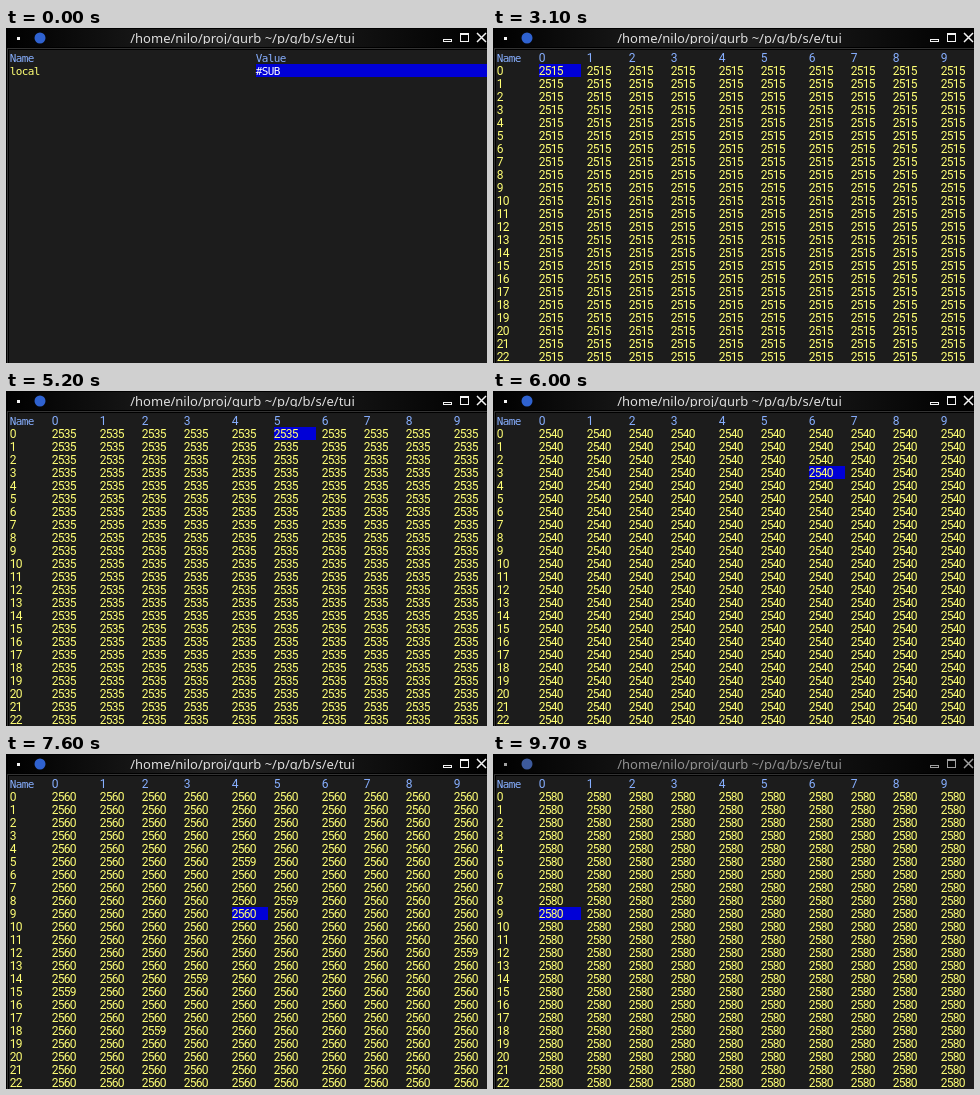
Write an HTML page with a canvas that moves like this. It is 481x335 px and loops after 10000 ms.

```html
<!DOCTYPE html>
<html lang="en">
<head>
<meta charset="utf-8">
<title>Terminal table</title>
<style>
html, body { margin: 0; width: 100%; height: 100%; overflow: hidden; background: #000; }
canvas { display: block; }
</style>
</head>
<body>
<canvas id="stage" width="481" height="335"></canvas>
<script>
const LOOP = 10000, W = 481, H = 335;
const ROWS = 23, COLS = 10;
const OPEN = 3100;                  // the grid appears
const COUNT = 3080, PERIOD = 502;   // cells gain 5 per period
const KEYS = 4400, REPEAT = 190;    // cursor key repeat
const RIGHT = 6, DOWN = 9, LEFT = 6;
const YELLOW = '#ffff75', PALE = '#ffffc8', WHITE = '#fff';
const HEAD = '#87afff', SELECT = '#0000d7', PANEL = '#1c1c1c';
const ctx = document.getElementById('stage').getContext('2d');

const clamp = (v, lo, hi) => Math.min(hi, Math.max(lo, v));
const colX = col => 46 + 6 * Math.floor((37 * col + 3) / 5);
const rowY = row => 36 + 13 * row; // row -1 is the header

function random(seed) {
  const v = Math.sin(seed * 12.9898) * 43758.5453;
  return v - Math.floor(v);
}

function box(x, y, w, h, color) {
  ctx.fillStyle = color;
  ctx.fillRect(x, y, w, h);
}

// Terminal text on a 6 px character grid
function type(text, x, row, color) {
  ctx.fillStyle = color;
  ctx.textAlign = 'center';
  [...String(text)].forEach((ch, i) => {
    ctx.font = /\d/.test(ch) ? '12px Roboto, sans-serif' : '11px "DejaVu Sans Mono", monospace';
    ctx.fillText(ch, x + 6 * i + 3, rowY(row) + 11);
  });
}

function titleBar(active) {
  const ink = active ? '#f4f4f4' : '#a0a0a0';
  const shine = ctx.createLinearGradient(0, 0, W, 0);
  shine.addColorStop(0, '#000');
  shine.addColorStop(0.45, active ? '#242424' : '#1e1e1e');
  shine.addColorStop(1, '#000');
  box(2, 1, W - 2, 18, shine);
  box(2, 20, W - 2, 1, '#333');

  box(11, 9, 3, 3, ink);
  ctx.fillStyle = active ? '#2f62d0' : '#3d5a9c';
  ctx.beginPath();
  ctx.arc(34, 10, 5.5, 0, 2 * Math.PI);
  ctx.fill();

  ctx.save();
  ctx.beginPath();
  ctx.rect(0, 0, W, 16);
  ctx.clip();
  ctx.font = '13px "Noto Sans", sans-serif';
  ctx.textAlign = 'center';
  ctx.fillStyle = active ? '#dedede' : '#929292';
  ctx.fillText('/home/nilo/proj/gurb ~/p/g/b/s/e/tui', 236.5, 15);
  ctx.restore();

  ctx.strokeStyle = ink;
  ctx.lineWidth = 1;
  ctx.strokeRect(437.5, 11.5, 8, 2);
  ctx.strokeRect(454.5, 5.5, 8, 8);
  box(454, 5, 9, 2, ink);
  ctx.lineWidth = 1.5;
  ctx.beginPath();
  ctx.moveTo(471, 5);
  ctx.lineTo(480, 14);
  ctx.moveTo(480, 5);
  ctx.lineTo(471, 14);
  ctx.stroke();
}

function drawList(t) {
  type('Name', 4, -1, HEAD);
  type('Value', 250, -1, HEAD);
  type('local', 4, 0, t < 1700 ? YELLOW : PALE);
  box(250, rowY(0), W - 250, 13, SELECT);
  type('#SUB', 250, 0, WHITE);
}

// The cursor walks right, then down, then back left
function cursor(t) {
  const step = clamp(Math.floor((t - KEYS) / REPEAT) + 1, 0, RIGHT + DOWN + LEFT);
  return {
    row: clamp(step - RIGHT, 0, DOWN),
    col: Math.min(step, RIGHT) - Math.max(0, step - RIGHT - DOWN)
  };
}

// Right after a tick a few cells still lag by one
function cellValue(t, row, col) {
  const n = Math.floor((t - COUNT) / PERIOD);
  const fresh = n > 0 && t - COUNT - n * PERIOD < 100;
  const lag = fresh && random(n * ROWS * COLS + row * COLS + col) < 0.02;
  return 2515 + 5 * n - lag;
}

function drawGrid(t) {
  const at = cursor(t);
  const x = colX(at.col);
  box(x, rowY(at.row), colX(at.col + 1) - 6 - x, 13, SELECT);
  type('Name', 4, -1, HEAD);
  for (let row = 0; row < ROWS; row++) type(row, 4, row, YELLOW);
  for (let col = 0; col < COLS; col++) {
    type(col, colX(col), -1, HEAD);
    for (let row = 0; row < ROWS; row++) type(cellValue(t, row, col), colX(col), row, YELLOW);
  }
}

function draw(now) {
  // The screen refreshes ten times a second and rests after the last tick
  const t = Math.min(Math.floor(now % LOOP / 100) * 100, 9700);
  box(0, 0, W, H, '#000');
  box(1, 20, 1, H - 20, '#333');
  box(3, 22, W - 3, H - 22, PANEL);
  titleBar(t < 9500);
  if (t < OPEN) drawList(t);
  else drawGrid(t);
  requestAnimationFrame(draw);
}
requestAnimationFrame(draw);
</script>
</body>
</html>
```
